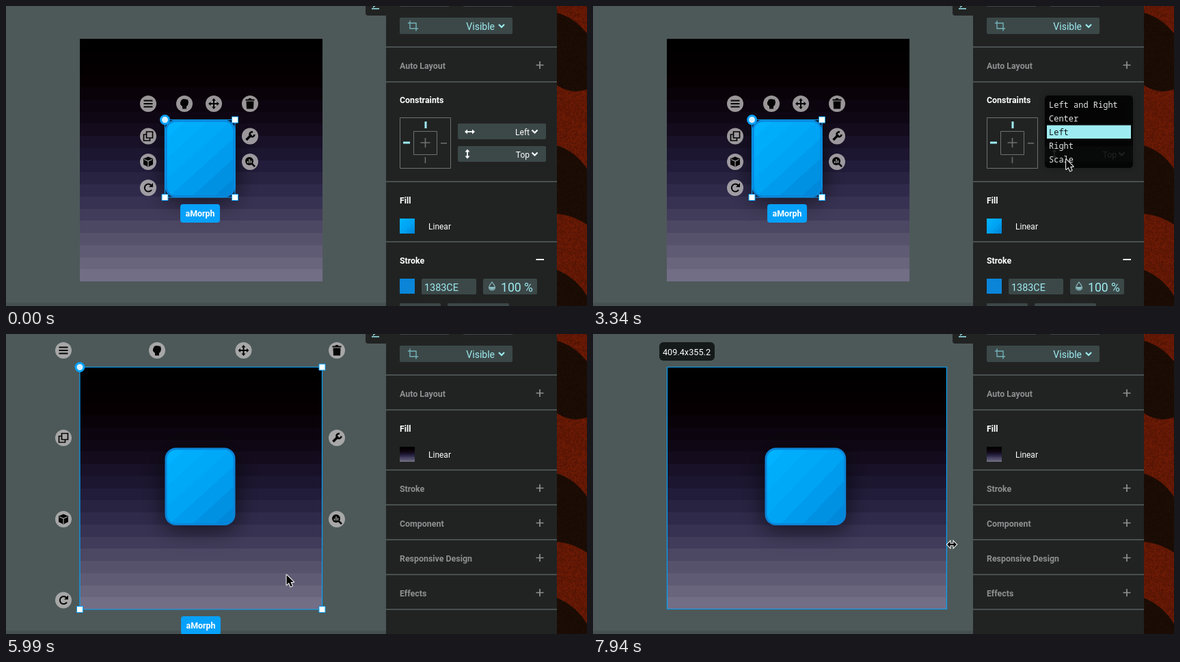
Recreate the animation shown at these times as an HTML page with a canvas. Size 850 by 439 pixels, loop 8000 ms.

```html
<!DOCTYPE html>
<html lang="en">
<head>
<meta charset="utf-8">
<title>Constraints demo</title>
<style>
html, body { margin: 0; width: 100%; height: 100%; overflow: hidden; background: #4d5959; }
canvas { display: block; }
</style>
</head>
<body>
<canvas id="stage" width="850" height="439"></canvas>
<script>
const ctx = document.getElementById('stage').getContext('2d');
const LOOP = 8000;
const BLUE = '#06a1fb', CYAN = '#9eecf2', FIELD = '#3c4848', PANEL = '#212322', GRAY = '#8d9191';
const SANS = 'Roboto, "Open Sans", sans-serif';
const MONO = '"Noto Sans Mono", "Liberation Mono", monospace';
const BOARD = { x: 108, y: 48, w: 355.2, h: 355 };

const lerp = (a, b, u) => a + (b - a) * u;
const clamp = u => Math.max(0, Math.min(1, u));
const smooth = u => u * u * (3 - 2 * u);
const easeIn = u => Math.pow(u, 1.3);
const easeOut = u => 1 - (1 - u) * (1 - u);

// Progress in n discrete jumps, the first at a and the last at b.
function steps(t, a, b, n) {
  if (t < a) return 0;
  return clamp((Math.floor((t - a) / (b - a) * (n - 1) + 1e-6) + 1) / n);
}

function box(x, y, w, h, color, r = 0) {
  ctx.fillStyle = color;
  ctx.beginPath();
  ctx.roundRect(x, y, w, h, r);
  ctx.fill();
}

function outline(x, y, w, h, color, width = 1, r = 0) {
  ctx.strokeStyle = color;
  ctx.lineWidth = width;
  ctx.beginPath();
  ctx.roundRect(x, y, w, h, r);
  ctx.stroke();
}

function text(str, x, y, size, color, weight = 400, align = 'left', family = SANS) {
  ctx.font = `${weight} ${size}px ${family}`;
  ctx.textAlign = align;
  ctx.textBaseline = 'alphabetic';
  ctx.fillStyle = color;
  ctx.fillText(str, x, y);
}

// Strokes or fills a path string around (x, y).
function path(d, x, y, color, width = 0) {
  ctx.save();
  ctx.translate(x, y);
  const p = new Path2D(d);
  if (width) {
    ctx.strokeStyle = color;
    ctx.lineWidth = width;
    ctx.stroke(p);
  } else {
    ctx.fillStyle = color;
    ctx.fill(p);
  }
  ctx.restore();
}

function banded(x0, y0, x1, y1, colors, n) {
  const g = ctx.createLinearGradient(x0, y0, x1, y1);
  for (let i = 0; i < n; i++) {
    const f = i / (n - 1) * (colors.length - 1);
    const k = Math.min(colors.length - 2, Math.floor(f));
    const c = colors[k].map((v, j) => Math.round(lerp(v, colors[k + 1][j], f - k)));
    g.addColorStop(i / n, `rgb(${c})`);
    g.addColorStop((i + 1) / n, `rgb(${c})`);
  }
  return g;
}

const NIGHT = [[0, 0, 0], [6, 0, 3], [17, 8, 23], [30, 25, 53], [52, 46, 79], [84, 80, 106], [114, 110, 133]];
const SKY = [[0, 178, 255], [0, 164, 244], [0, 136, 219]];
const nightFill = (y, h, n) => banded(0, y, 0, y + h, NIGHT, n);
const skyFill = (x, y, w, h, n) => banded(x, y, x + w, y + h, SKY, n);

// Patterned cloth at the right edge
const cloth = document.createElement('canvas');
cloth.width = 44;
cloth.height = 439;
(function weave() {
  const c = cloth.getContext('2d');
  c.fillStyle = '#6f1b05';
  c.fillRect(0, 0, 44, 439);
  c.fillStyle = '#1d0e05';
  ['M0 10Q24 16 44 40V122Q22 130 0 116z',
   'M0 204Q26 212 44 238V320Q24 306 0 304z',
   'M0 386Q28 398 44 424V439H0z'].forEach(d => c.fill(new Path2D(d)));
  let seed = 7;
  for (let y = 0; y < 439; y += 2) {
    for (let x = 0; x < 44; x += 2) {
      seed = (seed * 16807) % 2147483647;
      c.fillStyle = `rgba(10,2,0,${seed / 2147483647 * 0.25})`;
      c.fillRect(x, y, 2, 2);
    }
  }
})();

const ICONS = {
  menu: [['M-6.500-4.500H6.500M-6.500 0H6.500M-6.500 4.500H6.500', 2]],
  hand: [['M-6-2L-4-6L-1-7L5-6L6-2L5 2L3 4V7.500H-3V4L-6 1z', 0]],
  move: [['M-5 0H5M0-5V5', 2],
    ['M-8 0L-4.500-3V3zM8 0L4.500-3V3zM0-8L-3-4.500H3zM0 8L-3 4.500H3z', 0]],
  trash: [['M-6.500-6.500H-2.500L-1.500-8H1.500L2.500-6.500H6.500V-4.500H-6.500zM-5.500-3.500H5.500L5 7.500H-5z', 0]],
  copy: [['M-2.500-6.500H6.500V2.500H-2.500zM-2.500-2.500H-6.500V6.500H2.500V2.500', 1.7]],
  cube: [['M0-7.500L7-4.500V4L0 7.500L-7 4V-4.500z', 0], ['M-6-3.500L0-1L6-3.500M0-1V7', 1.2, 1]],
  turn: [['M4.500-3.500A5.500 5.500 0 1 0 5 3', 2], ['M7-7V-1H1z', 0]],
  wrench: [['M-5.500 5.500L2-2', 3.6], ['M4-6A3.500 3.500 0 1 0 6.500-2.500', 2.6]],
  zoom: [['M-7-1A6 6 0 1 1 5-1A6 6 0 1 1-7-1z', 0], ['M2.500 2.500L7 7', 2.5],
    ['M-3.500-1V2M-1-4V2M1.500-2V2', 1.4, 1]]
};

function tool(name, x, y) {
  ctx.fillStyle = 'rgba(190,186,187,.8)';
  ctx.beginPath();
  ctx.arc(x, y, 12, 0, 7);
  ctx.fill();
  for (const [d, w, pale] of ICONS[name]) path(d, x, y, pale ? '#a3a3a3' : '#050505', w);
}

// Selection frame with its handles, tools and name tag
function selection(l, t, r, b, cols, rows, tagX) {
  outline(l, t, r - l, b - t, BLUE, 1.2);
  for (const [x, y] of [[r, t], [r, b], [l, b]]) {
    box(x - 4.5, y - 4.5, 9, 9, '#fff');
    outline(x - 4.5, y - 4.5, 9, 9, BLUE, 1);
  }
  ctx.beginPath();
  ctx.arc(l, t, 6, 0, 7);
  ctx.fillStyle = '#d5effd';
  ctx.fill();
  ctx.strokeStyle = BLUE;
  ctx.lineWidth = 3;
  ctx.stroke();
  ['menu', 'hand', 'move', 'trash'].forEach((n, i) => tool(n, cols[i], rows[0]));
  ['copy', 'cube', 'turn'].forEach((n, i) => tool(n, cols[0], rows[i + 1]));
  ['wrench', 'zoom'].forEach((n, i) => tool(n, cols[3], rows[i + 1]));
  box(tagX, b + 10, 58, 27, BLUE, 4);
  text('aMorph', tagX + 29, b + 28, 12.4, '#fff', 700, 'center');
}

function artboard(w) {
  const { x, y, h } = BOARD, k = w / BOARD.w;
  ctx.save();
  ctx.beginPath();
  ctx.rect(x, y, w, h);
  ctx.clip();
  ctx.fillStyle = nightFill(y, h, 20);
  ctx.fillRect(x, y, w, h);
  const sx = x + 124.5 * k, sw = 103 * k, sy = 166.5, sh = 113.5;
  ctx.shadowColor = 'rgba(0,0,0,.65)';
  ctx.shadowBlur = 34;
  ctx.shadowOffsetY = 5;
  box(sx, sy, sw, sh, '#0a85d8', 16);
  ctx.shadowColor = 'transparent';
  box(sx + 3, sy + 3, sw - 6, sh - 6, skyFill(sx, sy, sw, sh, 7), 13);
  ctx.restore();
}

const plus = (x, y, color) => path('M-5.500 0H5.500M0-5.500V5.500', x, y, color, 1.7);
const chevron = (x, y, color) => path('M-4-2L0 2L4-2', x, y, color, 2.2);
const rule = y => box(556, y - 1, 250, 2, '#495050');

function section(name, y) {
  text(name, 576, y + 4.5, 12.4, GRAY, 700);
  plus(781, y - 0.5, GRAY);
}

function fillRow(y, swatch) {
  text('Fill', 576, y + 4.5, 12.4, '#fff', 700);
  box(576, y + 27, 22, 22, swatch);
  text('Linear', 618, y + 43, 12, '#fff');
}

function constraints(scaled) {
  text('Constraints', 576, 142, 12.4, '#fff', 700);
  outline(576.5, 163.5, 74, 74, '#6d7171');
  outline(596.5, 183.5, 34, 34, '#6d7171');
  path('M-7 0H7M0-7V7', 613.5, 200, '#6d7171', 1.6);
  box(612.5, 169, 3, 10, CYAN);
  if (scaled) box(581, 199.5, 10, 1.5, '#6d7171');
  else box(581, 198.5, 10, 3, CYAN);
  box(636, 200, 9, 1.5, '#6d7171');
  box(612.7, 221, 1.5, 9, '#6d7171');
  const rows = [[scaled ? 'Scale' : 'Left', 184], ['Top', 217]];
  for (const [label, y] of rows) {
    box(661, y - 12, 129, 23, FIELD, 2);
    text(label, 766, y + 4.5, 12, '#fff', 400, 'right');
    chevron(773.5, y - 0.5, '#fff');
  }
  path('M-4 0H4', 678.5, 184, '#fff', 1.8);
  path('M-7.500 0L-3.500-3.500V3.500zM7.500 0L3.500-3.500V3.500z', 678.5, 184, '#fff');
  path('M0-4V4', 675, 216.5, '#fff', 1.8);
  path('M0-7L-3.500-3H3.500zM0 7L-3.500 3H3.500z', 675, 216.5, '#fff');
}

function panel(t) {
  const boardPicked = t >= 5990;
  box(526, -6, 34, 20, PANEL, 4);
  path('M-5 4H6M-3 2L3-3', 540, 0, CYAN, 1.5);
  box(556, 0, 250, 439, PANEL);
  box(576, -4, 72, 5, FIELD);
  box(669, -4, 72, 5, FIELD);
  box(576, 17, 165, 24, FIELD, 2);
  path('M-7.500-4H4.500V7.500M-4.500-7.500V4H7.500', 595.5, 29, '#72b2b8', 1.4);
  text('Visible', 715, 34.5, 14, CYAN, 400, 'right');
  chevron(725, 29, CYAN);
  rule(60);
  section('Auto Layout', 87);
  rule(111);
  if (boardPicked) {
    fillRow(138, nightFill(165, 22, 20));
    ['Stroke', 'Component', 'Responsive Design', 'Effects'].forEach((name, i) => {
      rule(199 + i * 51);
      section(name, 226 + i * 51);
    });
    rule(403);
    return;
  }
  constraints(t >= 4150);
  rule(257);
  fillRow(284, skyFill(576, 311, 22, 22, 7));
  rule(345);
  text('Stroke', 576, 376.5, 12.4, '#fff', 700);
  box(775.5, 370, 11.5, 2, '#fff');
  box(576, 399, 22, 22, '#0a85d8');
  box(608, 399, 80, 23, FIELD, 2);
  text('1383CE', 612, 417, 14.4, CYAN);
  box(698, 399, 79, 23, FIELD, 2);
  path('M0-6C2-3 4.500-1 4.500 2A4.500 4 0 0 1-4.500 2C-4.500-1-2-3 0-6z', 711, 410, '#8bbcc0', 1.2);
  path('M-4 1H4A4 4 0 0 1-4 1z', 711, 410, '#8bbcc0');
  text('100 %', 724, 417.5, 17.6, CYAN);
  box(576, 435, 60, 10, FIELD, 2);
  box(646, 435, 90, 10, FIELD, 2);
}

function dropdown(t) {
  if (t >= 4150) return;
  const alpha = steps(t, 2160, 2340, 4);
  if (!alpha) return;
  ctx.save();
  ctx.globalAlpha = alpha;
  ctx.shadowColor = 'rgba(0,0,0,.35)';
  ctx.shadowBlur = 12;
  box(661, 131, 129, 106, 'rgba(0,0,0,.82)', 5);
  ctx.shadowColor = 'transparent';
  box(662, 172, 127, 23, '#080909');
  box(664, 174.5, 123, 19.5, CYAN);
  ['Left and Right', 'Center', 'Left', 'Right', 'Scale'].forEach((item, i) =>
    text(item, 667, 149 + i * 20, 12, i === 2 ? '#101414' : '#e2e4e4', 400, 'left', MONO));
  ctx.restore();
}

function arrow(x, y) {
  const d = 'M0 0V14.500L3.400 11.400L5.800 17L8.400 15.900L6 10.500H10.500z';
  ctx.lineJoin = 'round';
  path(d, x + 0.5, y + 0.5, '#fff', 2);
  path(d, x + 0.5, y + 0.5, '#050505');
  ctx.lineJoin = 'miter';
}

function resizer(x, y) {
  const d = 'M-7 0L-2.500-4.500V-1.300H2.500V-4.500L7 0L2.500 4.500V1.300H-2.500V4.500z';
  path(d, x, y, '#fff', 2);
  path(d, x, y, '#050505');
}

function pointer(t) {
  if (t < 300) return;
  if (t < 1080) {
    const u = smooth(clamp(Math.floor((t - 300) / 60) / 7));
    return arrow(lerp(40, 507, u), lerp(120, 139, u));
  }
  if (t < 2820) {
    const n = steps(t, 1080, 1860, 15) * 15;
    if (n <= 6) {
      const u = easeIn(n / 6);
      return arrow(lerp(507, 681.5, u), lerp(139, 185.5, u));
    }
    const u = easeOut((n - 6) / 9);
    return arrow(lerp(681.5, 756.5, u), 185.5);
  }
  if (t < 4510) {
    const u = smooth(steps(t, 2820, 3510, 13)), v = steps(t, 3630, 3740, 3);
    return arrow(lerp(756.5, 681.5, u) + v * 1.5, lerp(185.5, 230, u) - v * 3);
  }
  if (t < 6350) {
    const u = smooth(steps(t, 4510, 5030, 10));
    return arrow(lerp(683, 410, u), lerp(227, 352, u) + 22 * Math.sin(Math.PI * u));
  }
  if (t < 7290) {
    const u = smooth(steps(t, 6350, 6820, 9));
    const x = lerp(410, 463, u), y = lerp(352, 312, u);
    return u > 0.92 ? resizer(x, y) : arrow(x, y);
  }
  const n = drag(t);
  resizer(n < 4 ? lerp(463, 481, n / 4) : lerp(481, 525, (n - 4) / 8), lerp(311, 308, n / 12));
}

// Twelve jumps; the fourth lands at 7470 ms.
const drag = t => t < 7470
  ? Math.floor((t - 7290) / 60) + 1
  : Math.min(12, 4 + Math.floor((t - 7470) / 58.75 + 1e-6));

function boardWidth(t) {
  if (t < 7290) return BOARD.w;
  const n = drag(t);
  return n < 4 ? lerp(BOARD.w, 372.5, n / 4) : lerp(372.5, 409.4, (n - 4) / 8);
}

function draw(t) {
  box(0, 0, 850, 439, '#4d5959');
  box(0, 434, 556, 5, '#465051');
  ctx.drawImage(cloth, 806, 0);
  const w = boardWidth(t);
  artboard(w);
  if (t < 5990) {
    selection(232.5, 166.5, 335, 280, [208, 261, 304, 357], [143, 190.5, 228, 266], 255);
  } else if (t < 7290) {
    selection(108, 48.5, 462.5, 403, [84, 221, 347.5, 484], [24, 152, 271, 389.5], 256);
  } else {
    outline(108.5, 48.5, w - 0.5, 354, BLUE, 1.2);
    box(97, 12, 81, 27, '#141919', 6);
    text(`${w.toFixed(1)}x355.2`, 137, 30.5, 12.7, '#fff', 400, 'center');
  }
  panel(t);
  dropdown(t);
  pointer(t);
}

const start = performance.now();
function tick() {
  draw((performance.now() - start) % LOOP);
  requestAnimationFrame(tick);
}
tick();
</script>
</body>
</html>
```
